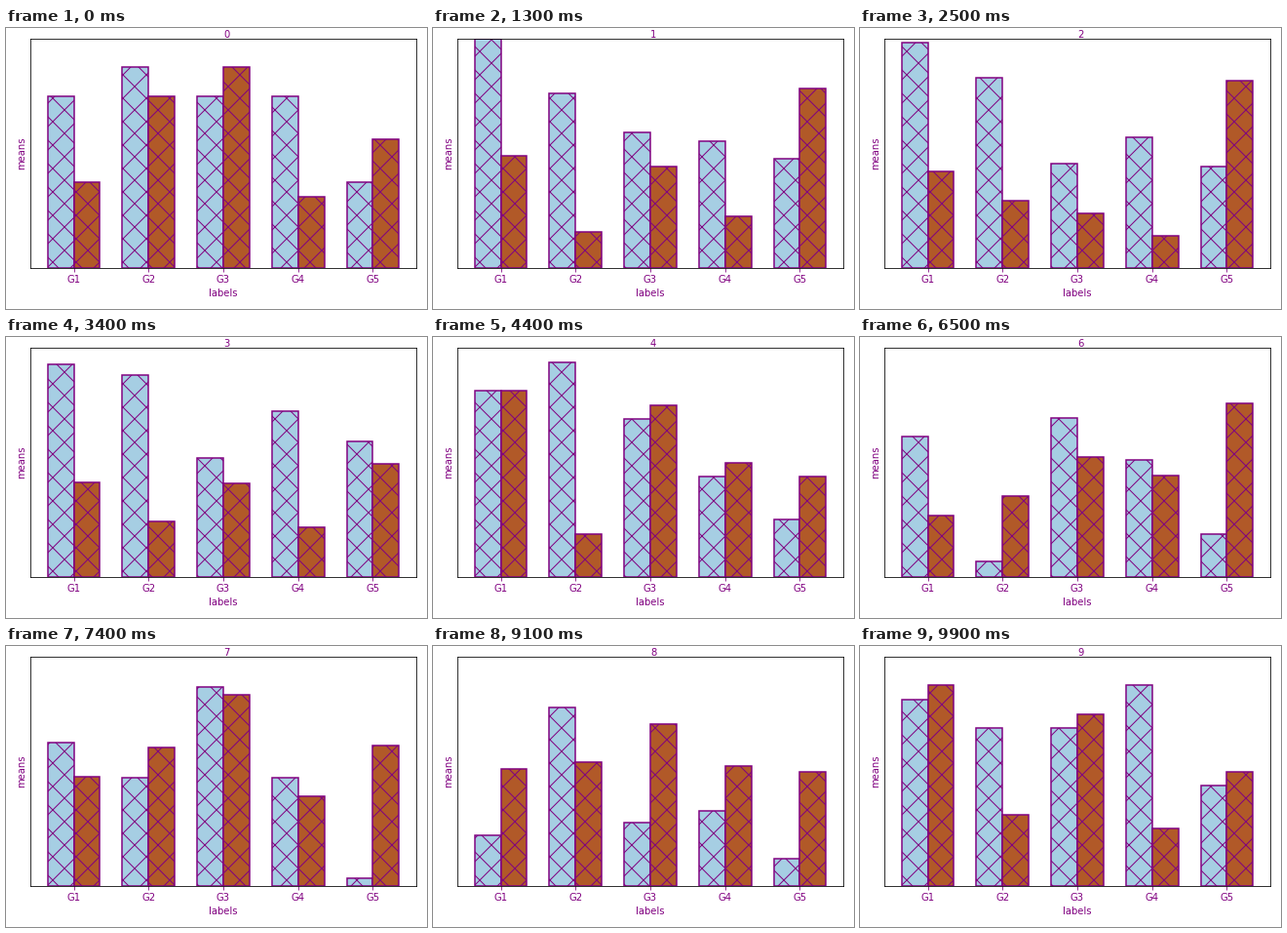
A matplotlib script for the animation above (10000 ms loop, 432 by 288 pixels).

```python
import matplotlib.pyplot as plt
import numpy as np
from matplotlib.animation import FuncAnimation

STEPS = 11
WIDTH = 0.35
INK = "purple"

plt.rcParams.update({"font.family": "DejaVu Sans", "font.size": 10,
                     "hatch.linewidth": 1.0})

# Bar heights at each whole step, one row per step, G1 to G5.
BLUE = np.array([
    [12, 14, 12, 12, 6], [16, 12, 10, 9, 8], [16, 13, 7, 8, 6],
    [15, 14, 8, 12, 10], [13, 15, 11, 7, 4], [8, 2, 12, 0, 13],
    [10, 1, 11, 9, 2], [10, 10, 15, 7, 0], [0, 13, 2, 2, 0],
    [13, 11, 11, 14, 7]])
BROWN = np.array([
    [6, 12, 14, 5, 9], [8, 2, 8, 4, 12], [7, 5, 3, 2, 15],
    [6, 4, 6, 3, 8], [13, 3, 12, 8, 7], [7, 2, 2, 8, 13],
    [4, 6, 9, 7, 12], [9, 11, 15, 6, 9], [6, 10, 11, 10, 8],
    [14, 5, 12, 4, 8]])

fig, ax = plt.subplots(figsize=(6, 4), dpi=72)
x = np.arange(5)
paired = plt.get_cmap("Paired")


def make_bars(offset, heights, color):
    return ax.bar(x + offset, heights, WIDTH, color=color, edgecolor=INK,
                  linewidth=1.5, hatch="x")


groups = [(make_bars(-WIDTH / 2, BLUE[0], paired(0.0)), BLUE),
          (make_bars(WIDTH / 2, BROWN[0], paired(1.0)), BROWN)]

ax.set_ylim(0, 16)
ax.set_xticks(x, [f"G{n}" for n in x + 1])
ax.set_yticks([])
ax.tick_params(colors=INK)
ax.set_xlabel("labels", color=INK)
ax.set_ylabel("means", color=INK)
fig.tight_layout()
counter = ax.text(0.5, 1.003, "0", transform=ax.transAxes, color=INK)


def update(frame):
    pos = frame / STEPS
    low = min(int(pos), len(BLUE) - 2)
    part = pos - low
    for bars, table in groups:
        heights = table[low] + (table[low + 1] - table[low]) * part
        for bar, height in zip(bars, heights):
            bar.set_height(height)
    counter.set_text(str(round(pos)))


anim = FuncAnimation(fig, update, frames=(len(BLUE) - 1) * STEPS + 1,
                     interval=100, repeat=True, repeat_delay=0)
plt.show()
```
